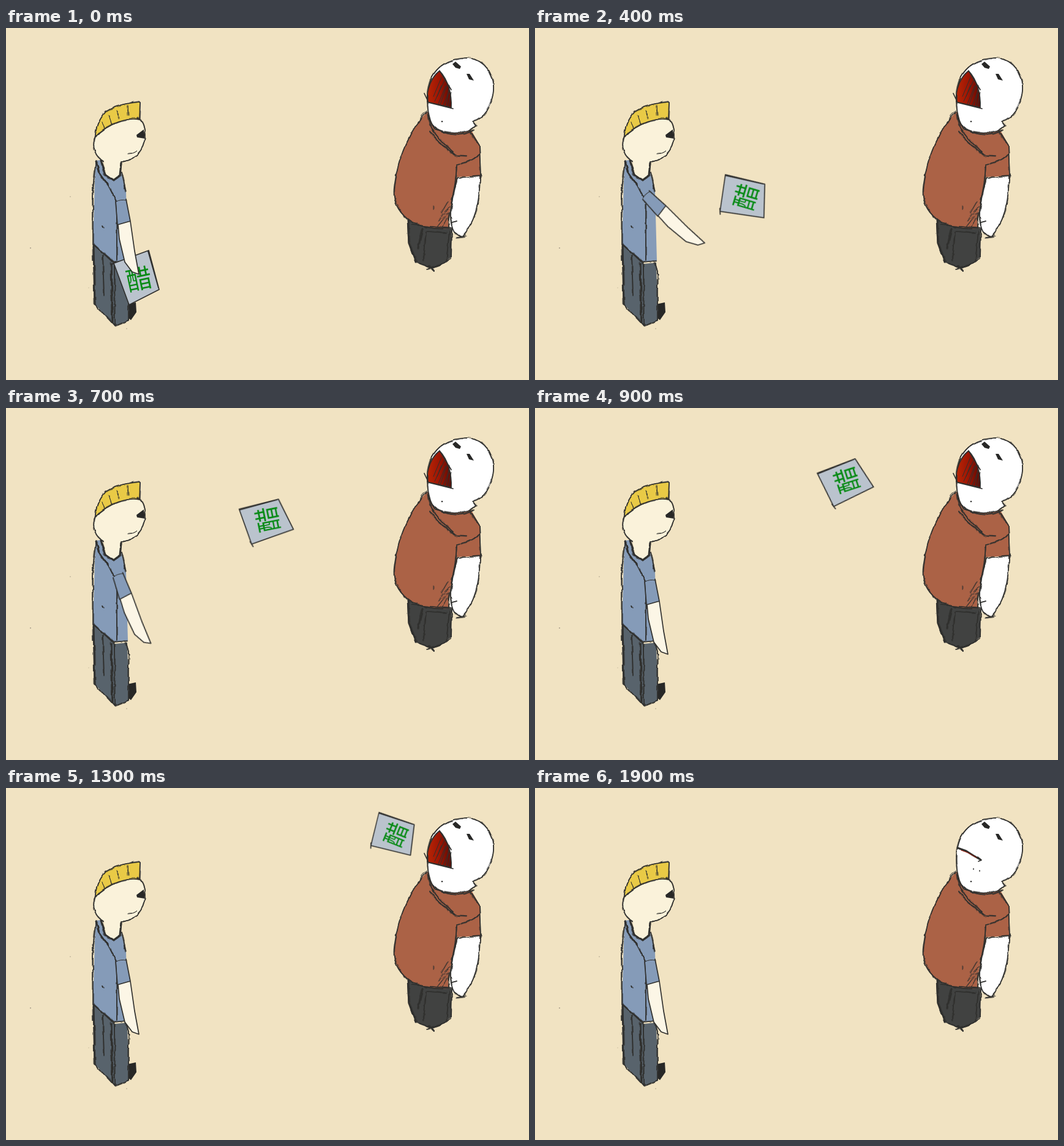
Animation, 854 px wide and 576 px high, one loop 2.2 s. Source, as an HTML page:

```html
<!DOCTYPE html>
<html lang="en">
<head>
<meta charset="utf-8">
<title>Throw and catch</title>
<style>
html, body { margin: 0; width: 100%; height: 100%; overflow: hidden; background: #f1e3c2; }
svg { display: block; width: 100vw; height: 100vh; }
.ink { fill: none; stroke: #30302e; stroke-width: 1.7; stroke-linecap: round; stroke-linejoin: round; }
.bold { stroke-width: 3; }
.thin { stroke-width: 1; }
.dark { fill: #282827; }
text { font: 500 42px "Noto Sans CJK SC", "Noto Sans CJK", sans-serif; fill: #078a14; text-anchor: middle; }

#box, #arm, #open, #shut { animation: 2200ms infinite; }
#box { animation-name: fly; animation-timing-function: step-end; }
#arm { animation-name: swing; animation-timing-function: step-end; }
#open { animation-name: open; animation-timing-function: step-end; }
#shut { animation-name: shut; animation-timing-function: step-end; }

/* Between key poses the parts advance once every 100 ms. */
@keyframes fly {
  0% { transform: translate(215px, 407.5px) rotate(0deg) scale(1); }
  4.54% { transform: translate(240px, 398px) rotate(-13deg) scale(1); }
  9.09% { transform: translate(264px, 379px) rotate(-30deg) scale(1); }
  13.63% { transform: translate(304px, 328px) rotate(-48deg) scale(1); }
  18.18% { transform: translate(340.5px, 276.5px) rotate(-61.5deg) scale(1); animation-timing-function: steps(2); }
  27.27% { transform: translate(383px, 216px) rotate(-86deg) scale(1); animation-timing-function: steps(3); }
  40.9% { transform: translate(506px, 120px) rotate(-96deg) scale(1); animation-timing-function: steps(2); }
  50% { transform: translate(565.5px, 96px) rotate(-72.5deg) scale(1); }
  54.54% { transform: translate(600px, 80px) rotate(-64deg) scale(.98); }
  59.09% { transform: translate(633px, 76px) rotate(-56deg) scale(.92); }
  63.63% { transform: translate(665px, 80px) rotate(-48deg) scale(.82); }
  68.18% { transform: translate(691px, 90px) rotate(-42deg) scale(.7); visibility: visible; }
  72.72% { transform: translate(703px, 98px) rotate(-38deg) scale(.48); }
  77.27% { transform: translate(710px, 105px) rotate(-34deg) scale(.25); visibility: visible; }
  81.81%, 100% { transform: translate(710px, 105px) rotate(-34deg) scale(.25); visibility: hidden; }
}
@keyframes swing {
  0% { transform: translate(172px, 288px) rotate(0deg); }
  4.54% { transform: translate(172px, 288px) rotate(-12deg); }
  9.09% { transform: translate(172px, 288px) rotate(-25deg); }
  13.63% { transform: translate(172px, 287px) rotate(-39deg); }
  18.18% { transform: translate(172px, 287px) rotate(-37deg); animation-timing-function: steps(2); }
  27.27% { transform: translate(167px, 279px) rotate(-18deg); animation-timing-function: steps(3); }
  40.9%, 100% { transform: translate(172px, 288px) rotate(0deg); }
}
@keyframes open { 0% { visibility: visible; } 86.36%, 100% { visibility: hidden; } }
@keyframes shut { 0% { visibility: hidden; } 86.36%, 100% { visibility: visible; } }
</style>
</head>
<body>
<svg viewBox="0 0 854 576">
  <defs>
    <filter id="rough" filterUnits="userSpaceOnUse" x="0" y="0" width="854" height="576" color-interpolation-filters="sRGB">
      <feTurbulence type="fractalNoise" baseFrequency=".06" numOctaves="2" seed="4"/>
      <feDisplacementMap in="SourceGraphic" scale="3.5" xChannelSelector="R" yChannelSelector="G"/>
    </filter>
    <filter id="rougher" filterUnits="userSpaceOnUse" x="0" y="0" width="854" height="576" color-interpolation-filters="sRGB">
      <feTurbulence type="fractalNoise" baseFrequency=".04" numOctaves="2" seed="11"/>
      <feDisplacementMap in="SourceGraphic" scale="6" xChannelSelector="R" yChannelSelector="G"/>
    </filter>
    <linearGradient id="throat">
      <stop stop-color="#b92505"/><stop offset=".5" stop-color="#9d1604"/><stop offset="1" stop-color="#5d0b04"/>
    </linearGradient>
  </defs>
  <rect width="854" height="576" fill="#f1e3c2"/>

  <!-- thrower -->
  <path class="dark" d="M198 452L212 449 213 465 204 478 199 474Z"/>
  <path fill="#58636c" d="M143 354L177 386 198 384 201 479 178 488 145 452Z"/>
  <path fill="#859bb8" d="M146 217L155 216 163 240 174 249 188 236 196 268 199 381 176 383 142 354Z"/>
  <path fill="#faf2da" d="M146 176C139 195 146 211 160 219L164 240 176 249 186 242 188 219C207 218 226 202 227 178 227 163 222 152 214 147L180 145Z"/>
  <path fill="#e9ca46" d="M146 178C146 160 155 146 163 137 177 127 195 123 219 121L218 150C200 146 168 155 146 178Z"/>
  <path class="dark" d="M213 175L225 166 227 181 214 179Z"/>

  <!-- catcher -->
  <path fill="#fff" d="M737 245L774 242C774 280 770 315 744 342L729 333C720 325 726 290 737 245Z"/>
  <path fill="#414241" d="M656 313L728 328 727 375C715 385 705 392 695 394 682 388 673 388 668 380 660 360 656 340 656 313Z"/>
  <path fill="#ab6246" d="M688 137C660 165 640 210 634 260 631 285 641 300 655 312 670 325 700 330 722 328 722 295 735 265 736 244L775 242 774 192 760 168Z"/>
  <path fill="#fff" d="M692 90C700 62 725 49 752 49 780 50 798 75 796 102 794 130 780 148 762 153L767 160 758 168Q727 177 700 165C689 150 684 115 692 90Z"/>
  <path class="dark" d="M729 59L734 55 743 63 741 67 734 65ZM752 75L757 75 764 86 756 84Z"/>
  <circle class="dark" cx="712" cy="153" r="1.2"/>

  <g id="open">
    <path fill="url(#throat)" d="M708 70C695 80 686 100 688 121L727 130C728 108 722 85 708 70Z"/>
    <path class="ink" d="M708 70C695 80 686 100 688 121L727 130C728 108 722 85 708 70L727 101M683 107L690 122 730 132"/>
    <path class="ink thin" d="M711 81L698 112M716 86L700 120M718 95L706 124M721 91L709 125M724 102L714 127M724 94L719 128M727 105L722 130M711 94L704 112"/>
  </g>
  <g id="shut">
    <path class="ink bold" d="M690 98L704 103 715 110 727 117"/>
    <path class="ink thin" style="stroke:#9d1604" d="M696 102L707 106 721 114"/>
    <path class="ink" d="M723 113L729 118 724 120M716 132v1M726 135v1"/>
  </g>

  <g id="sketch" class="ink" filter="url(#rough)">
    <path d="M146 176C139 195 146 211 159 218M188 219C207 218 226 202 227 178 227 163 222 152 214 147M146 178C146 160 155 146 163 137 177 127 195 123 219 121L218 150C200 146 168 155 146 178"/>
    <path d="M157 155L162 165M168 143L173 158M181 135L185 148M199 127L200 144M199 206Q207 206 213 201" class="thin"/>
    <path class="bold" d="M155 217L163 240 176 249 186 241 188 221M147 219L152 236 166 256"/>
    <path d="M147 217L142 260 142 354 176 383 198 381M189 236L196 268M166 256L181 285 181 380M157 324L158 326"/>
    <path class="bold" d="M143 356L145 452M172 386L174 482"/>
    <path d="M143 354L177 386 178 488 145 452M158 372L160 438M196 384L200 398 200 478 178 488"/>
    <path d="M692 90C700 62 725 49 752 49 780 50 798 75 796 102 794 130 780 148 762 153L767 160 758 168Q727 177 700 165C689 150 684 115 692 90"/>
    <path d="M688 137C660 165 640 210 634 260 631 285 641 300 655 312 670 325 700 330 722 328 722 295 735 265 736 225M758 168L773 192 775 242 738 245"/>
    <path d="M689 142C691 165 705 182 735 208L751 209M691 148Q698 168 722 173T764 167M736 223Q765 218 773 205M693 169Q711 194 732 207"/>
    <path d="M737 245C725 290 722 318 732 334L744 342C768 318 774 280 774 242M728 318L736 316M736 343L750 341"/>
    <path class="bold" d="M656 314L658 352 669 383M680 329L673 360"/>
    <path d="M662 322L728 328 727 377 708 389 695 394 675 385M686 334L682 380M688 333L719 335M724 333L719 382M687 395L705 389M690 390L699 398"/>
    <path d="M722 284L711 303M724 292L707 316M723 302L704 326M721 311L711 327M698 291V297" class="thin"/>
  </g>
  <use href="#sketch" filter="url(#rougher)" opacity=".65"/>

  <g fill="#746d60" opacity=".6">
    <circle cx="40" cy="360" r="1"/><circle cx="105" cy="276" r=".8"/>
    <circle cx="135" cy="425" r=".6"/><circle cx="197" cy="492" r=".8"/>
  </g>

  <g id="box">
    <path fill="#bac3cd" d="M-39-22.5L18-43.5 35 20.5-14 45.5Z"/>
    <path class="ink" d="M-39-22.5L18-43.5 35 20.5-14 45.5ZM-43-20L-35-25M17-42L34 18"/>
    <text transform="translate(2 3) rotate(-12)" y="16">醋</text>
  </g>

  <g id="arm">
    <path fill="#859bb8" d="M8-4L24-8 31 28 10 34Z"/>
    <path fill="#fcf6e6" d="M11 34L31 28 38 77 45 115 34 111 22 95 13 57Z"/>
    <path class="ink" d="M7-3L10 34 31 28 38 77 45 115 34 111 22 95 13 57 11 34M24-8L31 28"/>
    <path class="ink thin" d="M8-4Q15-8 25-6"/>
  </g>
</svg>
</body>
</html>
```
